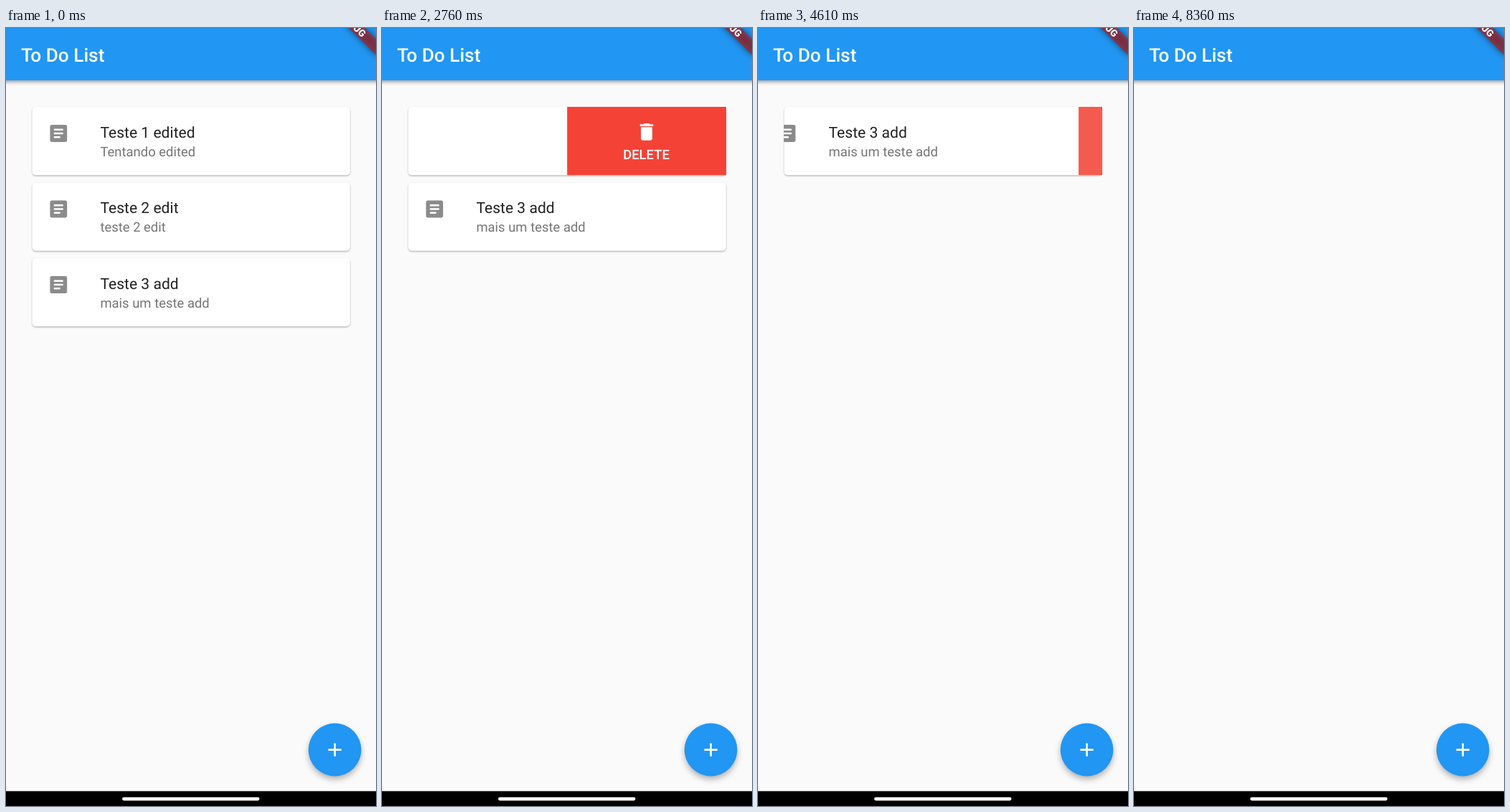
These frames come from a looping animation (516x1085 px, 8.45 s). An HTML page:

```html
<!DOCTYPE html>
<html lang="pt">
<head>
<meta charset="utf-8">
<title>To Do List</title>
<style>
  html, body { margin: 0; width: 100%; height: 100%; overflow: hidden; background: #fafafa; }
  svg { display: block; width: 100%; height: 100%; }
  text { font-family: Roboto, sans-serif; text-rendering: geometricPrecision; }
  .title { font-size: 21.1px; fill: #212121; }
  .sub { font-size: 18.47px; fill: #757575; }
  .medium { font-weight: 500; fill: #fff; }
</style>
</head>
<body>
<svg viewBox="0 0 516 1085" preserveAspectRatio="none">
  <defs>
    <filter id="soft1" x="-10%" y="-20%" width="120%" height="140%"><feGaussianBlur stdDeviation="1.2"/></filter>
    <filter id="soft3" x="-10%" y="-30%" width="120%" height="160%"><feGaussianBlur stdDeviation="2.6"/></filter>
    <filter id="soft5" x="-40%" y="-100%" width="180%" height="300%"><feGaussianBlur stdDeviation="4.6"/></filter>
    <clipPath id="cardClip"><rect x="36" y="110" width="444" height="95"/></clipPath>
    <clipPath id="paneClip"><rect id="reveal" x="480" y="110" width="0" height="95.3"/></clipPath>
  </defs>

  <rect width="516" height="1085" fill="#fafafa"/>
  <g id="list"></g>

  <g id="pane" clip-path="url(#paneClip)">
    <rect x="258" y="110" width="222" height="95.3" fill="#f44336"/>
    <circle id="ripple" cx="375" cy="157.5" r="0" fill="#fff"/>
    <path transform="translate(353.2 129) scale(1.319)" fill="#fff"
      d="M6 19c0 1.1.9 2 2 2h8c1.1 0 2-.9 2-2V7H6v12zM19 4h-3.5l-1-1h-5l-1 1H5v2h14V4z"/>
    <text class="medium" x="368.5" y="182.6" font-size="18.47" text-anchor="middle">DELETE</text>
  </g>

  <rect x="-10" y="-20" width="536" height="95.5" fill="#000" opacity=".36" filter="url(#soft3)"/>
  <rect width="516" height="73" fill="#2196f3"/>
  <text class="medium" x="21" y="46.8" font-size="26.2">To Do List</text>

  <g transform="translate(516 -36.7) rotate(45)">
    <rect x="-52.8" y="36.9" width="105.6" height="15.9" opacity=".5" filter="url(#soft5)"/>
    <rect x="-52.8" y="36.9" width="105.6" height="15.9" fill="#b71c1c" fill-opacity=".627"/>
    <text x="0" y="49.6" font-size="13.45" font-weight="900" fill="#fff" text-anchor="middle">DEBUG</text>
  </g>

  <circle cx="458.6" cy="1011" r="36" opacity=".34" filter="url(#soft5)"/>
  <circle cx="458.6" cy="1006.5" r="36.9" fill="#2196f3"/>
  <path d="M449.4 1006.6h18.4M458.6 997.4v18.4" stroke="#fff" stroke-width="2.6"/>

  <rect y="1064.3" width="516" height="21" fill="#000"/>
  <rect x="162" y="1072.7" width="191.5" height="4.8" rx="2.4" fill="#fff"/>
</svg>

<script>
const LOOP = 8450, PITCH = 105.5, OPEN_WIDTH = 221.8, RIGHT = 480;
const SWIPE_MS = 330, CLOSE_MS = 200;

// swipe: drag begins; gone: item leaves the list; tap: pane starts closing
const items = [
  { title: 'Teste 1 edited', sub: 'Tentando edited', swipe: 1000, gone: 2760, tap: 2800 },
  { title: 'Teste 2 edit', sub: 'teste 2 edit', swipe: 3750, gone: 4460, tap: 4500 },
  { title: 'Teste 3 add', sub: 'mais um teste add', swipe: 5230, gone: 5850, tap: 5850 }
];

const $ = id => document.getElementById(id);
const clamp = v => Math.min(1, Math.max(0, v));
const smooth = v => v * v * (3 - 2 * v);
const bezier = (s, a, b) => 3 * s * (1 - s) * (1 - s) * a + 3 * s * s * (1 - s) * b + s * s * s;

// CSS "ease" curve
function ease(x) {
  let lo = 0, hi = 1;
  for (let i = 0; i < 20; i++) {
    const mid = (lo + hi) / 2;
    if (bezier(mid, .25, .25) < x) lo = mid; else hi = mid;
  }
  return bezier(lo, .1, 1);
}

const card = i => `
  <g class="card" transform="translate(0 ${i * PITCH})">
    <rect x="36.7" y="111.2" width="443" height="95" rx="5" opacity=".34" filter="url(#soft1)"/>
    <rect x="36.5" y="110" width="443.3" height="95.2" rx="5" fill="#fff"/>
    <g clip-path="url(#cardClip)">
      <g class="content">
        <rect x="61.4" y="135.1" width="23.8" height="23.8" rx="2.7" fill="#8b8b8b"/>
        <path d="M67.9 141.7h10.7M67.9 147h10.7M67.9 152.3h6.7" stroke="#fff" stroke-width="2.6" stroke-linecap="round"/>
        <text class="title" x="131.4" y="152.6"></text>
        <text class="sub" x="131.4" y="178.8"></text>
      </g>
    </g>
  </g>`;

$('list').innerHTML = items.map((_, i) => card(i)).join('');
const cards = [...document.querySelectorAll('.card')].map(el => ({
  el,
  content: el.querySelector('.content'),
  title: el.querySelector('.title'),
  sub: el.querySelector('.sub')
}));

function slideAt(t) {
  const cur = items.find(it => t < it.tap + CLOSE_MS);
  if (!cur) return 0;
  const shown = smooth(clamp((t - cur.swipe) / SWIPE_MS));
  return OPEN_WIDTH * shown * (1 - ease(clamp((t - cur.tap) / CLOSE_MS)));
}

function drawRipple(t) {
  const cur = items.find(it => t >= it.tap && t < it.tap + 300);
  const dt = cur ? t - cur.tap : 0;
  $('ripple').setAttribute('r', cur ? 20 + dt * .84 : 0);
  $('ripple').setAttribute('opacity', .12 * (1 - clamp((dt - 120) / 150)));
}

function draw(t) {
  const removed = items.filter(it => t >= it.gone).length;
  const slide = removed < items.length ? slideAt(t) : 0;

  cards.forEach((c, i) => {
    const item = items[i + removed];
    c.el.style.display = item ? '' : 'none';
    if (!item) return;
    c.title.textContent = item.title;
    c.sub.textContent = item.sub;
    c.content.setAttribute('transform', `translate(${i ? 0 : -slide} 0)`);
  });

  $('pane').style.display = slide > 0 ? '' : 'none';
  $('reveal').setAttribute('x', RIGHT - slide);
  $('reveal').setAttribute('width', slide);
  drawRipple(t);
}

function tick() {
  draw(performance.now() % LOOP);
  requestAnimationFrame(tick);
}
tick();
</script>
</body>
</html>
```
